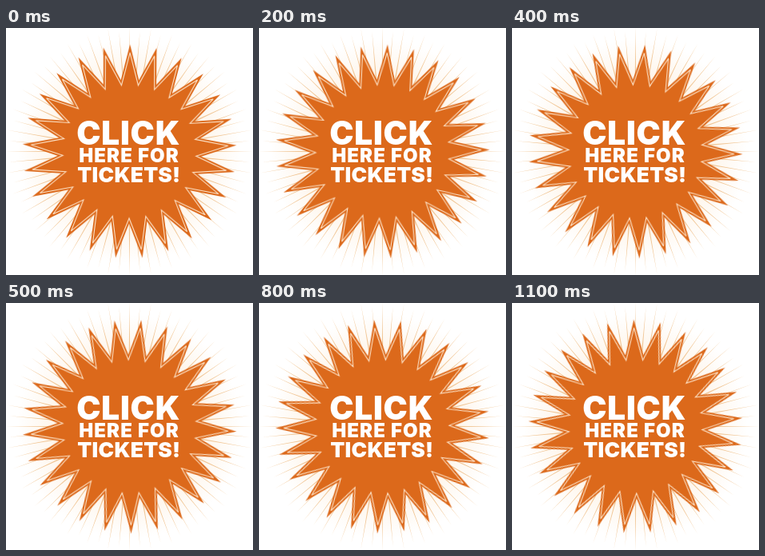
An HTML page that plays this animation: 309x309 px, repeating every 1.2 s.

```html
<!DOCTYPE html>
<html lang="en">
<head>
<meta charset="utf-8">
<title>Tickets badge</title>
<style>
  html, body { margin: 0; width: 100%; height: 100%; overflow: hidden; background: #fff; }
  svg { display: block; width: 309px; height: 309px; }
  text {
    font-family: Inter, "Open Sans", sans-serif;
    font-weight: 900;
    fill: #fff;
    text-anchor: middle;
  }
  #star { transform-origin: 0 0; }
</style>
</head>
<body>
<svg viewBox="0 0 309 309">
  <defs>
    <radialGradient id="glow">
      <stop offset="0.6" stop-color="#fef3e6"/>
      <stop offset="1" stop-color="#fff"/>
    </radialGradient>
  </defs>
  <g transform="translate(154.5 154.5)">
    <circle r="140" fill="url(#glow)"/>
    <path id="rays" fill="#f1c797"/>
    <g id="star">
      <path id="body" fill="#dc691b"/>
      <path id="line" fill="none" stroke="#fde3c8" stroke-width="1.1"/>
    </g>
  </g>
  <text x="153.2" y="146" font-size="40.5" letter-spacing="0.8">CLICK</text>
  <text x="154" y="167.8" font-size="24" letter-spacing="1.1">HERE FOR</text>
  <text x="153.8" y="192.8" font-size="26.3" letter-spacing="0.3">TICKETS!</text>
</svg>
<script>
  const POINTS = 25, RAYS = 72, LOOP = 1200, STEPS = 12;
  const pitch = 360 / POINTS;
  const byId = id => document.getElementById(id);

  // Clockwise angle in degrees, measured from the top
  const polar = (r, deg) => {
    const a = deg * Math.PI / 180;
    return (r * Math.sin(a)).toFixed(2) + ' ' + (-r * Math.cos(a)).toFixed(2);
  };
  const polygon = pts => 'M' + pts.join('L') + 'Z';

  const starPath = (outer, inner) => polygon(
    Array.from({ length: POINTS * 2 }, (_, i) => polar(i % 2 ? inner : outer, i * pitch / 2)));

  // Thin tapered rays, alternating long and slightly shorter
  const rayPath = () => Array.from({ length: RAYS }, (_, i) => {
    const deg = i * 360 / RAYS;
    return polygon([polar(82, deg - 0.6), polar(i % 2 ? 151 : 156, deg), polar(82, deg + 0.6)]);
  }).join('');

  byId('rays').setAttribute('d', rayPath());
  byId('body').setAttribute('d', starPath(134, 90));
  byId('line').setAttribute('d', starPath(123.5, 83.5));

  const start = 0.3;
  byId('star').animate(
    [{ transform: `rotate(${start}deg)` }, { transform: `rotate(${start + pitch}deg)` }],
    { duration: LOOP, iterations: Infinity, easing: `steps(${STEPS}, end)` });
</script>
</body>
</html>
```
